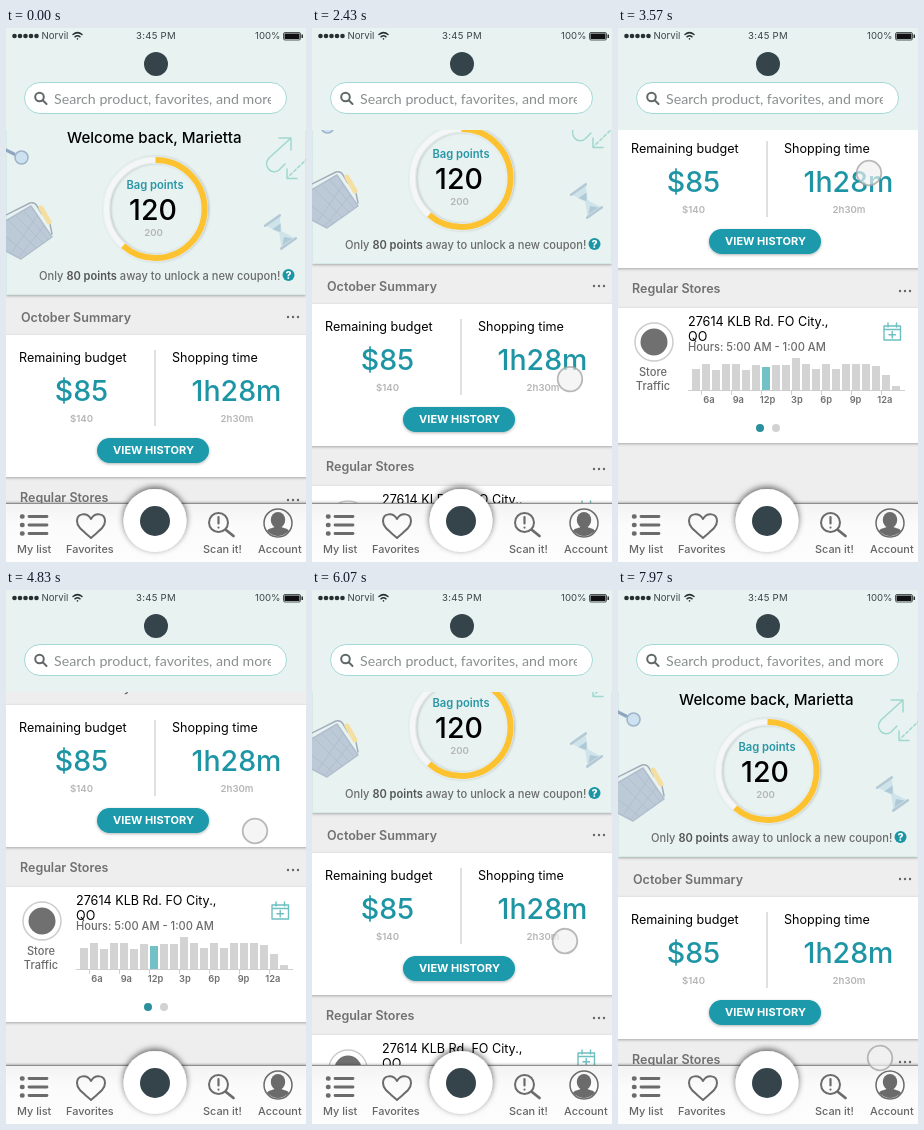
Animation, 300 px wide and 534 px high, one loop 8000 ms. Source, as an HTML page:

```html
<!DOCTYPE html>
<html lang="en">
<head>
<meta charset="utf-8">
<title>Grocery app</title>
<style>
html, body { margin: 0; width: 100%; height: 100%; overflow: hidden; background: #eee; }
svg { display: block; width: 300px; height: 534px; font-family: Inter, Roboto, sans-serif; }
text { white-space: pre; }
.mid { text-anchor: middle; }
.title { font-size: 12.6px; }
.section { font-size: 12.5px; font-weight: 600; fill: #717171; }
.big { font-size: 28.5px; font-weight: 500; fill: #1d95a5; }
.small { font-size: 9.6px; font-weight: 600; fill: #b5b5b5; }
.note { font-size: 11.1px; font-weight: 500; fill: #6b6b6b; }
.hour { font-size: 9.3px; font-weight: 600; fill: #707070; }
.tab { font-size: 10.9px; font-weight: 500; fill: #666; }
.status { font-size: 9.6px; fill: #3a4444; }
.line { fill: none; stroke-linecap: round; stroke-linejoin: round; }
</style>
</head>
<body>
<svg viewBox="0 0 300 534">
  <defs>
    <clipPath id="view"><rect y="102" width="300" height="374"/></clipPath>
    <clipPath id="field"><rect x="46" y="56" width="219" height="28"/></clipPath>
    <filter id="drop" x="-20%" y="-20%" width="140%" height="150%">
      <feDropShadow dx="0" dy="1" stdDeviation="1.6" flood-opacity=".3"/>
    </filter>
    <filter id="rise" x="-40%" y="-40%" width="180%" height="180%">
      <feDropShadow dx="0" dy="-1" stdDeviation="1.8" flood-opacity=".45"/>
    </filter>
    <filter id="lift" x="-40%" y="-40%" width="180%" height="180%">
      <feDropShadow dx="0" dy="-2" stdDeviation="3" flood-opacity=".6"/>
    </filter>
    <linearGradient id="bar" x2="0" y2="1">
      <stop stop-color="#f3f3f3"/><stop offset=".3" stop-color="#fbfbfb"/><stop offset="1" stop-color="#fdfdfd"/>
    </linearGradient>
  </defs>

  <rect width="300" height="534" fill="#eee"/>

  <g clip-path="url(#view)"><g id="page">
    <rect y="60" width="300" height="207" fill="#e7f2f1" filter="url(#drop)"/>
    <path d="M.5 100V266.500H299.500V100" fill="none" stroke="#d6eae8"/>

    <g class="line" stroke="#9fb3c8" stroke-width="1.500">
      <path d="M-2 121L8 126" stroke="#8ea6bf" stroke-width="3.200"/>
      <circle cx="15.500" cy="129.500" r="6.500" fill="#cde2f0"/>
      <path d="M-2 188L24 175Q29 174 31 178L36 186M44 196L46 206" stroke="#a3adba"/>
      <path d="M-6 196L25 178L46 209L15 231L-6 220Z" fill="#bcc9d7" stroke="#b0becd"/>
      <path d="M2 192L30 220M10 188L37 215M18 183L42 211M-4 206L21 226M6 224L31 188M13 229L38 198" stroke="#aebccc" stroke-width=".8"/>
      <path d="M35 180L43 194" stroke="#f4dfa0" stroke-width="5"/>
    </g>
    <g class="line" stroke="#a0d8cf" stroke-width="1.500">
      <path d="M279 136L273 142C266 148 256 138 263 130L285 110M273 110H285V122"/>
      <path d="M302 130L282 149" stroke-dasharray="3 2.500"/>
      <path d="M281 141V150.500H291"/>
    </g>
    <g transform="translate(274.500 204) rotate(-35)">
      <path d="M-8 -13H8L1.500 0L8 13H-8L-1.500 0Z" fill="#cfe3ea"/>
      <path d="M-5 -7H5L0 0ZM-6 12H6L0 6Z" fill="#afc9d6"/>
      <path d="M-9 -14H9M-9 14H9" class="line" stroke="#b3c9d5" stroke-width="2.500"/>
    </g>

    <text x="61" y="115" font-size="15.100" font-weight="500">Welcome back, Marietta</text>
    <g fill="none" stroke-width="6" transform="rotate(-90 149.500 181)">
      <circle cx="149.500" cy="181" r="49" stroke="#f5f6f8" filter="url(#drop)"/>
      <circle cx="149.500" cy="181" r="49" stroke="#fdc22f" pathLength="100" stroke-dasharray="61.500 100"/>
    </g>
    <text class="mid" x="149" y="161" font-size="11.200" font-weight="600" fill="#2996a5">Bag points</text>
    <text class="mid" x="147" y="192" font-size="28.500" font-weight="500">120</text>
    <text class="mid small" x="147.500" y="208">200</text>
    <text class="note" x="33" y="252">Only <tspan font-weight="600" fill="#555">80 points</tspan> away to unlock a new coupon!</text>
    <circle cx="282.500" cy="247" r="6" fill="#1d95a5"/>
    <text class="mid" x="282.500" y="251" font-size="10.500" font-weight="800" fill="#fff">?</text>

    <text class="section" x="15" y="294">October Summary</text>
    <rect x="-8" y="307" width="316" height="142" fill="#fff" filter="url(#drop)"/>
    <path d="M149 322V398" stroke="#d6d6d6" stroke-width="1.500"/>
    <text class="title" x="13" y="334">Remaining budget</text>
    <text class="title" x="166" y="334">Shopping time</text>
    <text class="mid big" x="75.500" y="373">$85</text>
    <text class="mid big" x="230.500" y="373">1h28m</text>
    <text class="mid small" x="75.500" y="394">$140</text>
    <text class="mid small" x="231" y="394">2h30m</text>
    <rect x="91" y="410" width="112" height="25" rx="12.500" fill="#1b99aa" filter="url(#drop)"/>
    <text class="mid" x="147.500" y="426.200" font-size="11" font-weight="700" fill="#fff">VIEW HISTORY</text>

    <text class="section" x="14" y="474">Regular Stores</text>
    <rect x="-8" y="489" width="316" height="135" fill="#fff" filter="url(#drop)"/>
    <circle cx="36" cy="523" r="19" fill="#fff" stroke="#ccc" stroke-width="1.500"/>
    <circle cx="36" cy="523" r="13.500" fill="#707070"/>
    <text class="mid note" x="35" y="557">Store</text>
    <text class="mid note" x="35" y="571">Traffic</text>
    <text class="title" x="70" y="507">27614 KLB Rd. FO City.,</text>
    <text class="title" x="70" y="522">QO</text>
    <text class="note" x="70" y="532">Hours: 5:00 AM - 1:00 AM</text>
    <path class="line" d="M266 507H282.500V521H266ZM266 510.500H282.500M270 504V508M278.500 504V508M274.200 512.500V519M271 515.800H277.500" stroke="#6dbfc1" stroke-width="1.400"/>
    <g id="chart"></g>
    <circle cx="142" cy="609" r="4" fill="#2b909d"/>
    <circle cx="158" cy="609" r="4" fill="#d2d2d2"/>
    <g id="menus" fill="#666"></g>
  </g></g>

  <rect width="300" height="102" fill="#e7f2f1"/>
  <g id="signal" fill="#26302f"></g>
  <text class="status" x="35.500" y="11.300">Norvil</text>
  <g class="line" stroke="#26302f" stroke-width="1.500">
    <path d="M67 6.500Q71.500 2.800 76 6.500M69 8.800Q71.500 6.800 74 8.800"/>
    <path d="M71.500 10.800V11"/>
  </g>
  <text class="mid status" x="150" y="11.300" letter-spacing=".25">3:45 PM</text>
  <text class="status" x="249" y="11.300">100%</text>
  <rect x="277.500" y="4.500" width="17" height="7.500" rx="1.500" fill="none" stroke="#26302f" stroke-width=".8"/>
  <rect x="278.500" y="5.500" width="15" height="5.500" fill="#111"/>
  <rect x="295.500" y="6.500" width="1.500" height="3.500" fill="#26302f"/>
  <circle cx="150" cy="36" r="12" fill="#34444a"/>
  <rect x="18.500" y="54.500" width="262" height="31" rx="15.500" fill="#fff" stroke="#a3dad7"/>
  <g class="line" stroke="#606868" stroke-width="2">
    <circle cx="33.500" cy="69" r="4.300"/><path d="M37 72.500L40.500 76"/>
  </g>
  <text x="48" y="75.500" font-size="14.200" fill="#8a8f8f" clip-path="url(#field)" style="font-family:Lato,sans-serif">Search product, favorites, and more</text>

  <rect x="-8" y="476" width="316" height="70" fill="url(#bar)" filter="url(#rise)"/>
  <path d="M0 475.500H300" stroke="#8e8e8e"/>
  <circle cx="149" cy="492.500" r="31.500" fill="#fff" filter="url(#lift)"/>
  <circle cx="149" cy="493" r="15" fill="#34444a"/>
  <g class="line" stroke="#6b6b6b" stroke-width="2">
    <path d="M23 488.500H41M23 497H41M23 505.500H41" stroke-width="2.800"/>
    <path d="M16 488.500H16.500M16 497H16.500M16 505.500H16.500" stroke-width="4.500"/>
    <path d="M85 510C79 504 71 500 71 493C71 485 81 484 85 491C89 484 99 485 99 493C99 500 91 504 85 510Z"/>
    <circle cx="212.500" cy="494.500" r="9.500"/>
    <path d="M220 502L227.500 508" stroke-width="2.800"/>
    <path d="M212.500 489V495.500M212.500 499.500V499.600" stroke-width="2.200"/>
    <circle cx="272" cy="495" r="14" stroke-width="1.500"/>
    <path d="M261 503C263 499 268 501 269 498H275C276 501 281 499 283 503Q272 513 261 503Z" fill="#6b6b6b" stroke="none"/>
    <ellipse cx="272" cy="492" rx="7.200" ry="8" fill="#6b6b6b" stroke="none"/>
  </g>
  <text class="tab" x="11" y="525">My list</text>
  <text class="tab" x="60" y="525">Favorites</text>
  <text class="tab" x="197" y="525">Scan it!</text>
  <text class="tab" x="252" y="525">Account</text>

  <g id="cursor">
    <circle id="touch" r="12.300" fill="#f0f0f0" fill-opacity=".68" stroke="#a2a2a2" stroke-opacity=".75" stroke-width="1.800"/>
    <path id="hand" transform="translate(0 -.5) scale(1.1)" d="M-3 9.500L-6.500 3.500Q-8.500 .5 -6.500 0Q-5 0 -3.500 2.500L-4.800 -4.500Q-4.500 -7 -2.600 -5.500L-1.300 -1.500L-1.500 -7Q-.2 -9.500 1 -7L1.400 -1.500L2.500 -6.500Q4 -8.300 4.800 -6L4.300 -.8L6 -4Q7.700 -5 7.700 -2.800L6.500 4L4.500 9.500Z" fill="#fff" stroke="#111" stroke-linejoin="round"/>
  </g>
</svg>
<script>
const LOOP = 8000;
const $ = id => document.getElementById(id);

function add(parent, tag, attrs, text) {
  const el = document.createElementNS("http://www.w3.org/2000/svg", tag);
  for (const key in attrs) el.setAttribute(key, attrs[key]);
  if (text) el.textContent = text;
  parent.append(el);
}

const bars = [21, 26, 20, 26, 26, 20, 25, 23, 25, 25, 32, 26, 21, 26, 21, 26, 26, 26, 24, 15, 4];
bars.forEach((height, i) => add($("chart"), "rect", {
  x: 74 + i * 10, y: 571 - height, width: 8, height, fill: i === 7 ? "#74c0c7" : "#d3d3d3"
}));
add($("chart"), "path", { d: "M70 571.5H287", stroke: "#cfcfcf" });
["6a", "9a", "12p", "3p", "6p", "9p", "12a"].forEach((label, i) => {
  add($("chart"), "path", { d: `M${83.5 + i * 30} 571V576`, stroke: "#cfcfcf" });
  add($("chart"), "text", { class: "mid hour", x: 91 + i * 29.3, y: 584 }, label);
});
for (let i = 0; i < 5; i++) add($("signal"), "circle", { cx: 8.5 + i * 5.5, cy: 8, r: 2.3 });
for (const cy of [289, 472])
  for (let i = 0; i < 3; i++) add($("menus"), "circle", { cx: 282 + i * 5, cy, r: 1.2 });

// Monotone cubic through [time, value] points.
function track(points) {
  const slope = i => (points[i + 1][1] - points[i][1]) / (points[i + 1][0] - points[i][0]);
  const tangents = points.map((_, i) => {
    if (i === 0 || i === points.length - 1) return 0;
    const a = slope(i - 1), b = slope(i);
    return a * b <= 0 ? 0 : 2 * a * b / (a + b);
  });
  return t => {
    if (t <= points[0][0]) return points[0][1];
    const i = points.findIndex(p => p[0] >= t) - 1;
    if (i < 0) return points[points.length - 1][1];
    const [t0, v0] = points[i], [t1, v1] = points[i + 1];
    const span = t1 - t0, u = (t - t0) / span, w = 1 - u;
    return v0 * w * w * (1 + 2 * u) + v1 * u * u * (3 - 2 * u)
      + span * u * w * (tangents[i] * w - tangents[i + 1] * u);
  };
}

const scrollAt = track([
  [2140, 0], [2870, 116], [3570, 209], [4640, 209], [4830, 192], [5000, 155],
  [5200, 155], [5830, 47], [5970, 47], [6070, 44], [6600, 0]
]);

const pointer = [
  [1630, 292, 410], [1730, 259, 395], [2140, 259, 395], [2870, 255, 237], [3570, 251, 145],
  [3690, 251, 145], [3800, 248, 150], [3830, 248, 150], [3870, 251, 151], [4000, 251, 151],
  [4330, 255, 181], [4640, 255, 181], [4830, 249, 241], [5200, 249, 241], [5830, 253, 348],
  [5970, 253, 348], [6070, 253, 351], [6600, 253, 398], [6770, 253, 398], [6930, 254, 403],
  [7800, 254, 403], [7970, 262, 468]
];
const pointerX = track(pointer.map(p => [p[0], p[1]]));
const pointerY = track(pointer.map(p => [p[0], p[2]]));

const show = (el, on) => el.setAttribute("visibility", on ? "visible" : "hidden");

function draw(t) {
  $("page").setAttribute("transform", `translate(0 ${-Math.round(scrollAt(t))})`);
  $("cursor").setAttribute("transform", `translate(${pointerX(t)} ${pointerY(t)})`);
  show($("hand"), t >= 1595 && t < 1630);
  show($("touch"), t >= 1630);
}

const start = performance.now();
function tick() {
  draw((performance.now() - start) % LOOP);
  requestAnimationFrame(tick);
}
tick();
</script>
</body>
</html>
```
